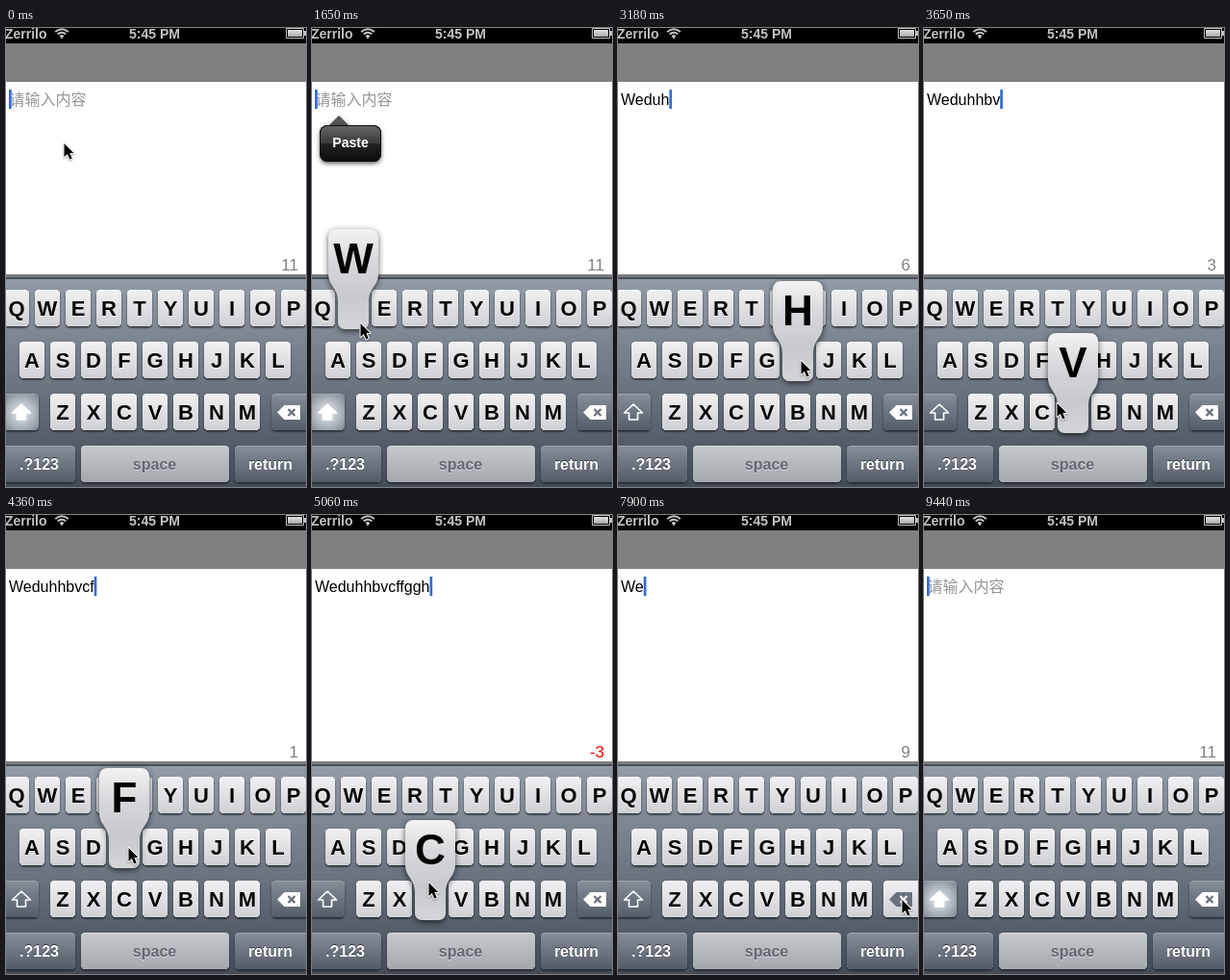
An HTML page with a canvas that plays this animation: 312x477 px, repeating every 9490 ms.

```html
<!DOCTYPE html>
<html lang="en">
<head>
<meta charset="utf-8">
<title>Text entry with character counter</title>
<style>
html, body { margin: 0; width: 100%; height: 100%; overflow: hidden; background: #fff; }
canvas { display: block; }
</style>
</head>
<body>
<canvas id="stage" width="312" height="477"></canvas>
<script>
const c = document.getElementById('stage').getContext('2d');
const LOOP = 9490, STEP = 117.65, LIMIT = 11;
const SANS = '"Liberation Sans", Arial, sans-serif';
const CJK = '"Noto Sans CJK SC", "Noto Sans CJK", sans-serif';
const ROWS = [['QWERTYUIOP', 11, 272], ['ASDFGHJKL', 27, 326], ['ZXCVBNM', 59, 380]];

const keys = {};
for (const [letters, x, y] of ROWS)
  [...letters].forEach((ch, i) => keys[ch] = { x: x + i * 32, y });

// letter, time pressed, pointer offset from the key's top centre
const TAPS = [
  ['W', 1600, 7, 35], ['E', 2020, 4, 28], ['D', 2280, 3, 22], ['U', 2720, 3, 24],
  ['H', 2940, 3, 20], ['H', 3130, 3, 20], ['B', 3330, 1, 14], ['V', 3540, -17, 10],
  ['C', 3840, 2, 14], ['F', 4080, 4, 20], ['F', 4260, 4, 20], ['G', 4450, 2, 20],
  ['G', 4630, 2, 20], ['H', 4810, -2, 20], ['C', 5010, -2, 2]
];
const INSERT = 100, LINGER = 150;

// single deletions, then a held key that repeats
const DELETES = [5900, 6100, 6300, 6500, 6700];
const HOLD_END = 8100;
for (let i = 0; i < 10; i++) DELETES.push(7180 + i * 100);

const path = [[0, 60, 120], [120, 60, 120], [600, 25, 75], [950, 25, 75], [2588, 157, 338],
  [5500, 265, 425], [5850, 295, 400], [8560, 295, 400], [9060, 270, 480]];
for (const [ch, t, dx, dy] of TAPS)
  for (const d of [0, INSERT]) path.push([t + d, keys[ch].x + dx, keys[ch].y + dy]);
path.sort((a, b) => a[0] - b[0]);

const CARET_OFF = [[340, 720], [1170, 1500], [8600, 9050]];
const within = (t, a, b) => t >= a && t < b;

function textAt(t) {
  const typed = TAPS.filter(p => t >= p[1] + INSERT).map(p => p[0]).join('');
  const left = typed.length - DELETES.filter(d => t >= d).length;
  return (typed.slice(0, 1) + typed.slice(1).toLowerCase()).slice(0, left);
}

function pointerAt(t) {
  const i = path.findIndex(p => p[0] > t);
  if (i < 1) return null;
  const [t0, x0, y0] = path[i - 1], [t1, x1, y1] = path[i];
  const u = (t - t0) / (t1 - t0), e = u * u * (3 - 2 * u);
  return [x0 + (x1 - x0) * e, y0 + (y1 - y0) * e];
}

function gradient(y0, y1, ...colors) {
  const g = c.createLinearGradient(0, y0, 0, y1);
  colors.forEach((col, i) => g.addColorStop(i / (colors.length - 1), col));
  return g;
}

function rect(x, y, w, h, fill) {
  c.fillStyle = fill;
  c.fillRect(x, y, w, h);
}

function box(x, y, w, h, r, fill) {
  c.beginPath();
  c.roundRect(x, y, w, h, r);
  c.fillStyle = fill;
  c.fill();
}

function label(str, x, y, size, fill, { bold = true, align = 'center', family = SANS } = {}) {
  c.font = `${bold ? 'bold ' : ''}${size}px ${family}`;
  c.textAlign = align;
  c.fillStyle = fill;
  c.fillText(str, x, y);
}

function shape(points) {
  c.beginPath();
  points.forEach(([x, y]) => c.lineTo(x, y));
  c.closePath();
}

function withShadow(color, blur, dy, draw) {
  c.save();
  c.shadowColor = color;
  c.shadowBlur = blur;
  c.shadowOffsetY = dy;
  draw();
  c.restore();
}

function keyCap(x, y, w, top, bottom, edge) {
  withShadow('rgba(20,25,32,.85)', 2, 1.5, () => box(x, y, w, 38, 4.5, bottom));
  box(x, y, w, 38, 4.5, edge);
  box(x, y + 1, w, 37, 4.5, gradient(y, y + 38, top, bottom));
}
const lightKey = (x, y, w) => keyCap(x, y, w, '#f1f1f3', '#cfd0d4', '#fff');
const darkKey = (x, y, w) => keyCap(x, y, w, '#868e98', '#535c68', '#a0a7af');

function statusBar() {
  const tone = '#c3c3c3';
  rect(0, 0, 312, 16, '#000');
  label('Zerrilo', 42.5, 11, 14, tone, { align: 'right' });
  label('5:45 PM', 154.5, 11, 14, tone);
  c.strokeStyle = tone;
  c.lineWidth = 2;
  for (const r of [5.8, 9.3]) {
    c.beginPath();
    c.arc(58, 10.5, r, -Math.PI * .76, -Math.PI * .24);
    c.stroke();
  }
  c.beginPath();
  c.moveTo(58, 11.5);
  c.arc(58, 10.5, 3.2, -Math.PI * .76, -Math.PI * .24);
  c.fillStyle = tone;
  c.fill();
  c.lineWidth = 1;
  c.strokeRect(291.5, .5, 18, 10);
  rect(293, 2, 15, 7, gradient(2, 9, '#e2e2e2', '#a8a8a8'));
  rect(310, 3, 2, 5, tone);
}

function editor(t, text) {
  c.font = `16px ${SANS}`;
  const end = 3 + c.measureText(text).width;
  const suggest = text === 'Wed';
  if (suggest) rect(0, 65, end, 20, '#dde8f6');
  if (text) label(text, 3, 80, 16, '#000', { bold: false, align: 'left' });
  else label('请输入内容', 3.5, 79.5, 16, '#969696', { bold: false, align: 'left', family: CJK });
  if (!CARET_OFF.some(([a, b]) => within(t, a, b)))
    rect(text ? end : 3, 64, 2.7, 20, '#2f6bdb');
  const rest = LIMIT - text.length;
  label(rest, 304, 252, 17, rest < 0 ? '#f00' : '#808080', { bold: false, align: 'right' });
  if (suggest) suggestion();
  if (within(t, 700, 1700)) pasteMenu();
}

function suggestion() {
  withShadow('rgba(60,80,120,.55)', 3, 1.5, () => box(-12, 86, 73.5, 21.5, 10.5, '#fff'));
  c.strokeStyle = '#b4c0d8';
  c.lineWidth = 1;
  c.stroke();
  label("We'd", 3, 102, 16, '#1478c8', { bold: false, align: 'left' });
  label('×', 49, 102, 14, '#8b8b8b');
}

function pasteMenu() {
  withShadow('rgba(0,0,0,.6)', 4, 2, () => {
    shape([[17, 102], [28, 91], [39, 102]]);
    c.fillStyle = '#555';
    c.fill();
    box(8, 101, 64, 38, 8, '#222');
  });
  box(8, 101, 64, 38, 8, '#111');
  box(9, 102, 62, 18, [7, 7, 0, 0], gradient(102, 120, '#666', '#393939'));
  box(9, 120, 62, 18, [0, 0, 7, 7], gradient(120, 138, '#222', '#0c0c0c'));
  label('Paste', 40, 124, 14, '#fff');
}

function shiftKey(on) {
  darkKey(-4, 380, 38);
  if (on) {
    const g = c.createRadialGradient(16, 400, 3, 16, 400, 23);
    g.addColorStop(0, '#dfe3e8');
    g.addColorStop(1, '#87909a');
    box(-4, 381, 38, 37, 4.5, g);
  }
  shape([[16, 391], [25.5, 400], [20.5, 400], [20.5, 407], [11.5, 407], [11.5, 400], [6.5, 400]]);
  c.lineJoin = 'round';
  c.lineWidth = 1.6;
  c.strokeStyle = c.fillStyle = '#fff';
  c.stroke();
  if (on) c.fill();
}

function deleteKey(down) {
  (down ? lightKey : darkKey)(276, 380, 40);
  shape([[282, 399.5], [289.5, 392], [306, 392], [306, 407], [289.5, 407]]);
  c.fillStyle = down ? '#68717d' : '#fff';
  c.fill();
  c.strokeStyle = down ? '#fff' : '#666f7a';
  c.lineWidth = 2.2;
  c.beginPath();
  for (const s of [-1, 1]) {
    c.moveTo(293.5, 399.5 - 3.5 * s);
    c.lineTo(300.5, 399.5 + 3.5 * s);
  }
  c.stroke();
}

function keyboard(t, text) {
  rect(0, 256, 312, 4, '#7e7e7e');
  rect(0, 259, 312, 2, '#4a5059');
  rect(0, 261, 312, 216, gradient(261, 477, '#929ba6', '#6c7580', '#434b56'));
  for (const ch in keys) {
    const { x, y } = keys[ch];
    lightKey(x - 13, y, 26);
    withShadow('#fff', 0, 1, () => label(ch, x, y + 27, 22, '#000'));
  }
  shiftKey(!text);
  deleteKey(within(t, 6700, HOLD_END) || DELETES.some(d => d < 6700 && within(t, d, d + INSERT)));
  darkKey(-4, 434, 76);
  keyCap(78, 434, 154, '#c6c9cd', '#a4a8ad', '#d9dbde');
  darkKey(238, 434, 78);
  withShadow('#333a43', 0, -1, () => {
    label('.?123', 34.5, 459, 16, '#fff');
    label('return', 275, 459, 16, '#fff');
  });
  withShadow('#d8dade', 0, 1, () => label('space', 154.5, 459, 16, '#626972'));
  const tap = TAPS.find(p => within(t, p[1], p[1] + LINGER));
  if (tap) keyPopup(tap[0]);
}

function keyPopup(ch) {
  const { x, y } = keys[ch], top = y - 63, end = y + 41;
  c.beginPath();
  c.moveTo(x, top);
  c.arcTo(x + 26, top, x + 26, y, 8);
  c.lineTo(x + 26, y - 17);
  c.bezierCurveTo(x + 26, y - 3, x + 16, y - 3, x + 16, y + 13);
  c.arcTo(x + 16, end, x, end, 7);
  c.arcTo(x - 16, end, x - 16, y, 7);
  c.lineTo(x - 16, y + 13);
  c.bezierCurveTo(x - 16, y - 3, x - 26, y - 3, x - 26, y - 17);
  c.arcTo(x - 26, top, x, top, 8);
  c.closePath();
  c.fillStyle = gradient(top, end, '#f3f3f4', '#d6d7da', '#c8c9cd', '#d4d5d8');
  withShadow('rgba(0,0,0,.65)', 6, 2, () => c.fill());
  label(ch, x, y - 17, 44, '#000');
}

function pointer(t) {
  const p = pointerAt(t);
  if (!p) return;
  c.save();
  c.translate(...p);
  shape([[.5, 0], [.5, 14], [3.8, 11], [6.2, 16.5], [8.7, 15.4], [6.4, 10], [10.5, 10]]);
  c.lineJoin = 'round';
  c.lineWidth = 2;
  c.strokeStyle = '#fff';
  c.fillStyle = '#000';
  withShadow('rgba(0,0,0,.35)', 2, 1, () => c.stroke());
  c.fill();
  c.restore();
}

function frame(now) {
  const t = Math.floor((now % LOOP) / STEP) * STEP;
  const text = textAt(t);
  rect(0, 0, 312, 477, '#fff');
  statusBar();
  rect(0, 16, 312, 40, '#808080');
  editor(t, text);
  keyboard(t, text);
  pointer(t);
}

const start = performance.now();
(function tick() {
  frame(performance.now() - start);
  requestAnimationFrame(tick);
})();
</script>
</body>
</html>
```
